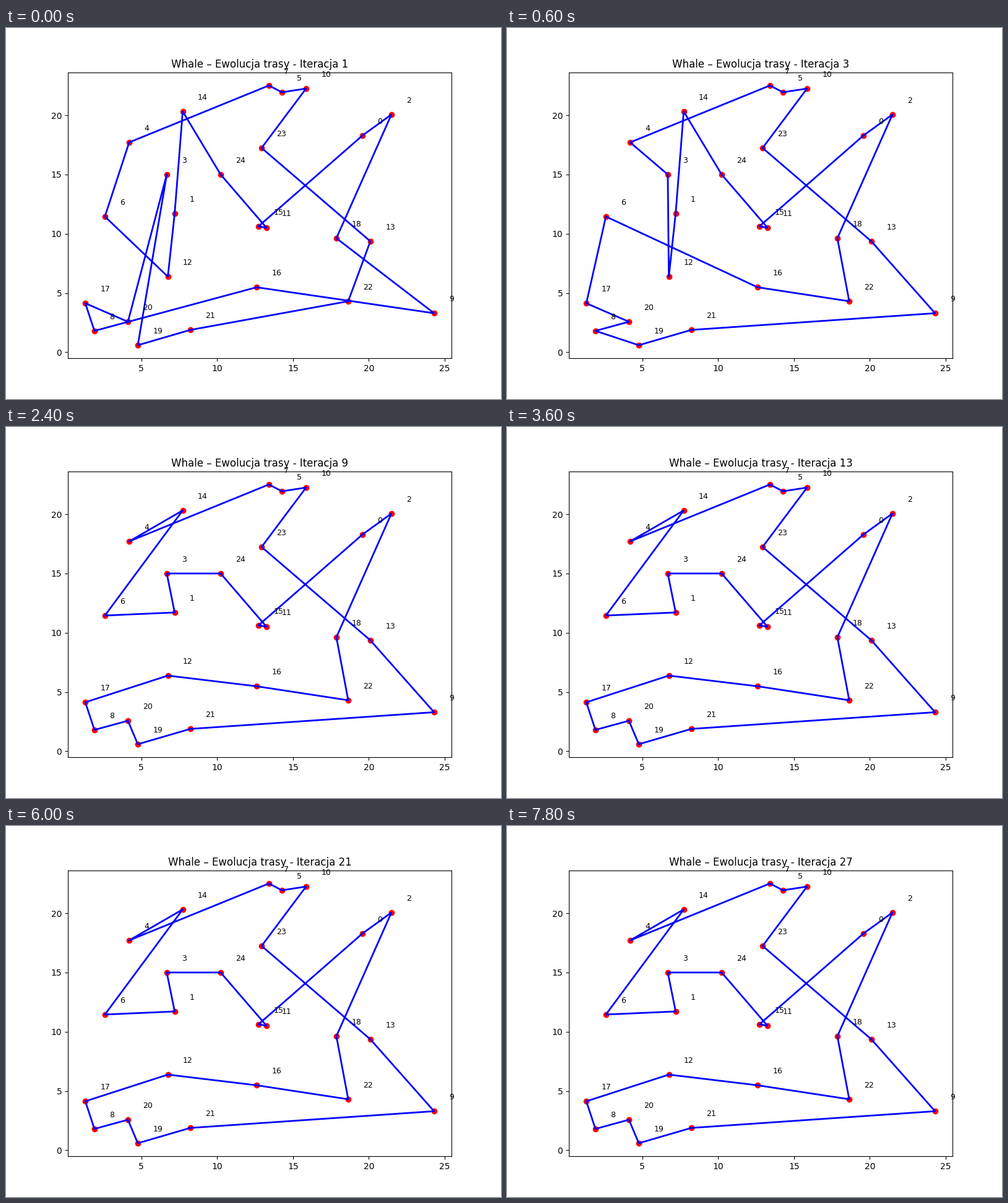
Recreate the animation shown at these times as a matplotlib script. Size 800 by 600 pixels, loop 8 s.

```python
import matplotlib.pyplot as plt
from matplotlib.animation import FuncAnimation

STEP_MS = 100
LOOP_MS = 8000
ITERATION_MS = 300
LABEL_OFFSET = 1

# Key points of the map, listed in the order of the first tour.
cities = {
    0: (19.58, 18.29), 2: (21.49, 20.06), 18: (17.86, 9.62), 9: (24.30, 3.29),
    16: (12.60, 5.48), 8: (1.91, 1.80), 17: (1.31, 4.13), 20: (4.12, 2.57),
    3: (6.68, 15.00), 19: (4.77, 0.59), 21: (8.23, 1.88), 22: (18.64, 4.30),
    13: (20.10, 9.36), 23: (12.93, 17.24), 10: (15.86, 22.25), 5: (14.27, 21.94),
    7: (13.41, 22.51), 4: (4.20, 17.71), 6: (2.60, 11.45), 12: (6.75, 6.38),
    1: (7.20, 11.71), 14: (7.73, 20.32), 24: (10.23, 15.00), 11: (13.25, 10.51),
    15: (12.72, 10.62),
}

# The tour improves by exchanging pairs of cities, three pairs at a time
# in every second iteration, until no exchange is left.
exchanges = [(9, 22), (3, 8), (3, 6), (6, 12), (8, 20), (3, 14)]


def best_tour(iteration):
    tour = list(cities)
    for a, b in exchanges[:iteration // 2 * 3]:
        i, j = tour.index(a), tour.index(b)
        tour[i], tour[j] = b, a
    return tour + tour[:1]


fig, ax = plt.subplots(figsize=(8, 6), dpi=100)
ax.scatter(*zip(*cities.values()), c="red")
route, = ax.plot(*zip(*cities.values()), "b-", linewidth=2)
for number, (x, y) in cities.items():
    ax.text(x + LABEL_OFFSET, y + LABEL_OFFSET, str(number), fontsize=9)
title = ax.set_title("")


def update(frame):
    iteration = frame * STEP_MS // ITERATION_MS + 1
    route.set_data(*zip(*(cities[number] for number in best_tour(iteration))))
    title.set_text(f"Whale – Ewolucja trasy - Iteracja {iteration}")
    return route, title


animation = FuncAnimation(fig, update, frames=LOOP_MS // STEP_MS,
                          interval=STEP_MS, repeat=True, repeat_delay=0)
plt.show()
```
